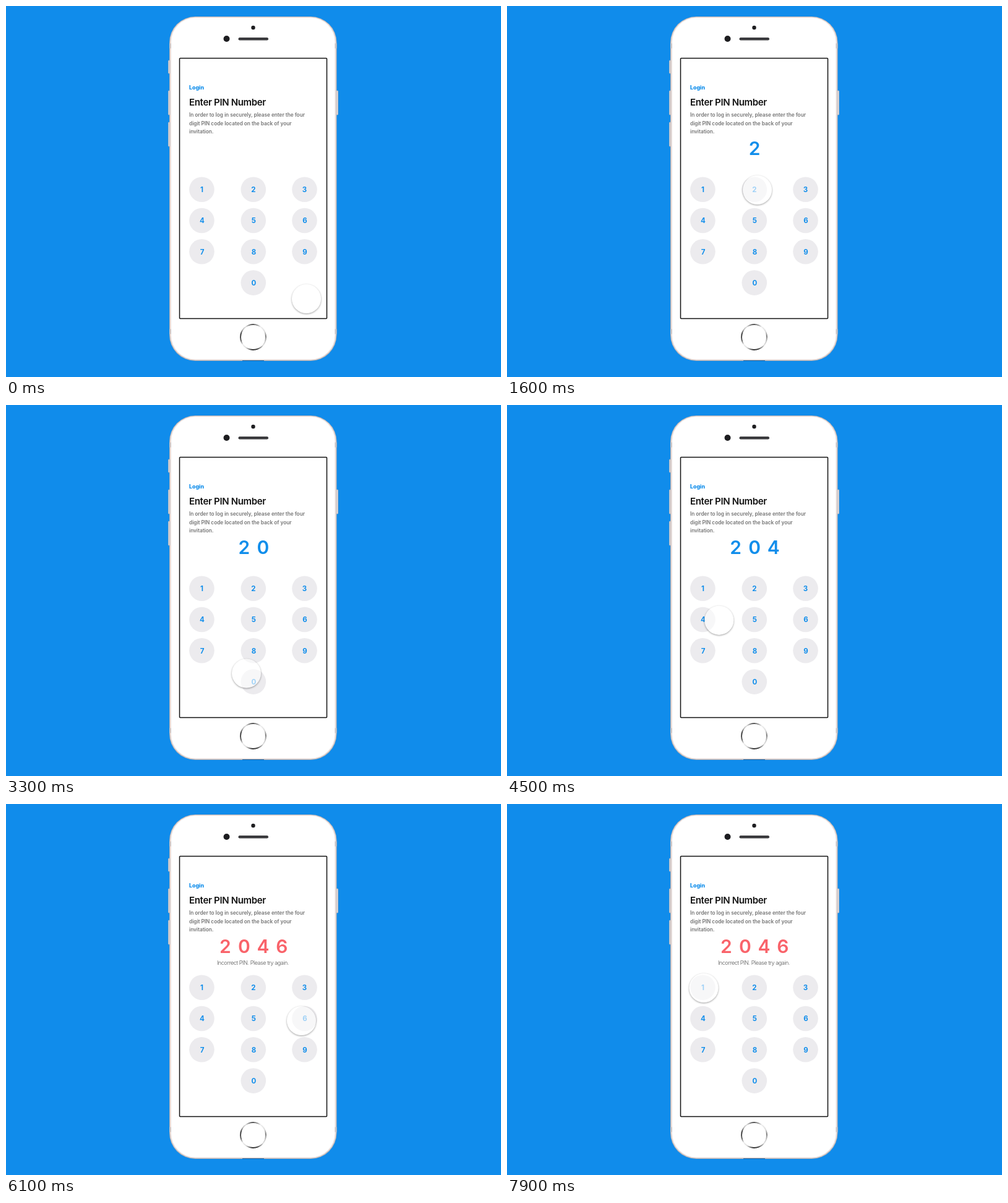
An HTML page that plays this animation: 800 by 600 pixels, repeating every 8 s.

```html
<!DOCTYPE html>
<html lang="en">
<head>
<meta charset="utf-8">
<title>PIN login</title>
<style>
html, body { margin: 0; width: 100%; height: 100%; overflow: hidden; background: #108ceb; }
svg { position: absolute; left: 0; top: 0; font-family: Inter, "Open Sans", sans-serif; }
.blue { fill: #118eeb; }
.mid { text-anchor: middle; }
.copy { font-size: 8.3px; font-weight: 600; letter-spacing: -.04px; fill: #767676; }
.key { font-size: 11.5px; font-weight: 700; }
#pin { font-size: 30px; font-weight: 600; }
#error { font-size: 9px; font-weight: 300; letter-spacing: -.4px; fill: #555; }
#home, #touch { position: absolute; border-radius: 50%; }
#home {
  left: 378px; top: 514px; width: 43px; height: 43px;
  background: conic-gradient(#555, #999 20deg, #eee 35deg, #ddd 65deg, #777 85deg, #ccc 110deg,
    #ddd 130deg, #444 160deg, #333 185deg, #ddd 215deg, #eee 235deg, #666 255deg, #333 285deg,
    #bbb 305deg, #ddd 325deg, #555 350deg);
}
#home::after { content: ""; position: absolute; inset: 2.3px; border-radius: 50%; background: #fff; }
#touch {
  left: -23.5px; top: -23.5px; width: 47px; height: 47px;
  background: rgba(255, 255, 255, .6);
  box-shadow: 0 1px 3px rgba(0, 0, 0, .4);
}
</style>
</head>
<body>
<svg width="800" height="600" viewBox="0 0 800 600">
  <g fill="#e9e3e3" stroke="#b5b0b3" stroke-width=".8">
    <rect x="262.4" y="88" width="4" height="21" rx="1"/>
    <rect x="262.4" y="137" width="4" height="39" rx="1"/>
    <rect x="262.4" y="188" width="4" height="39" rx="1"/>
    <rect x="532.6" y="137" width="4" height="39" rx="1"/>
  </g>
  <rect x="264" y="17" width="270.5" height="557" rx="42" fill="#b8b1b3"/>
  <rect x="265" y="17.8" width="268.5" height="555" rx="41" fill="#e9dfdd"/>
  <rect x="267" y="19" width="264.5" height="552.5" rx="39" fill="#fff"/>
  <path d="M264 64.5h3M531.5 64.5h3M264 526.5h3M531.5 526.5h3" stroke="#c9c6c8" stroke-width="8"/>
  <path d="M382 573.5h35" stroke="#285f92"/>
  <g fill="#1d1d20">
    <circle cx="399.5" cy="35" r="3.2"/>
    <circle cx="356.5" cy="53" r="5"/>
  </g>
  <rect x="375.5" y="51" width="48.5" height="4.4" rx="2.2" fill="#3a3a3d"/>
  <rect x="280.5" y="84.5" width="238" height="421" rx="1" fill="#fff" stroke="#111" stroke-width="1.5"/>
  <text class="blue" x="296" y="135" font-size="8.8" font-weight="800">Login</text>
  <text x="296" y="161.3" font-size="15" font-weight="600" letter-spacing="-.33" fill="#111">Enter PIN Number</text>
  <g class="copy">
    <text x="296" y="179.3">In order to log in securely, please enter the four</text>
    <text x="296" y="192.7">digit PIN code located on the back of your</text>
    <text x="296" y="206">invitation.</text>
  </g>
  <g id="pin" class="mid"></g>
  <text id="error" class="mid" x="399" y="260">Incorrect PIN. Please try again.</text>
  <g id="keys" class="mid"></g>
</svg>
<div id="home"></div>
<div id="touch"></div>
<script>
const $ = id => document.getElementById(id);
const LOOP = 8000, STEP = 100, ERROR_AT = 6000;

// Touch path: time, x, y
const path = [
  [0, 485, 473], [200, 485, 473],
  [1100, 404, 297], [1700, 404, 297],
  [2600, 398, 446], [3100, 398, 446],
  [4000, 319, 347.5], [4260, 319, 347.5],
  [5260, 479, 348.5], [5700, 479, 348.5],
  [6100, 477, 350], [6400, 477, 350],
  [7400, 317.5, 297], [LOOP, 317.5, 297]
];
const presses = [[1400, 2], [2900, 0], [4100, 4], [5800, 6]];

$('keys').innerHTML = [1, 2, 3, 4, 5, 6, 7, 8, 9, 0].map((n, i) => {
  const x = n ? [316.4, 399.8, 482.5][i % 3] : 399.8;
  const y = 296.7 + 50.3 * Math.floor(i / 3);
  const dx = n < 4 && n ? 0 : .6;
  return `<circle cx="${x}" cy="${y}" r="20.3" fill="#ecebee"/>
    <text class="key blue" x="${x + dx}" y="${y + 4.3}">${n}</text>`;
}).join('');

function touchAt(t) {
  const i = path.findIndex(p => p[0] > t);
  const [t0, x0, y0] = path[i - 1], [t1, x1, y1] = path[i];
  const p = (t - t0) / (t1 - t0), e = p * p * (3 - 2 * p);
  return [x0 + (x1 - x0) * e, y0 + (y1 - y0) * e];
}

let shown = '';
function draw(now) {
  const t = Math.floor(now % LOOP / STEP) * STEP;
  const [x, y] = touchAt(t);
  $('touch').style.transform = `translate(${x}px, ${y}px)`;

  const failed = t >= ERROR_AT;
  const digits = presses.filter(p => t >= p[0]).map(p => p[1]);
  const state = digits.join('') + failed;
  if (state !== shown) {
    shown = state;
    $('pin').innerHTML = digits.map((d, i) =>
      `<text x="${400.2 + (i - (digits.length - 1) / 2) * 30.5}" y="240.5">${d}</text>`).join('');
    $('pin').setAttribute('fill', failed ? '#f9636a' : '#118eeb');
    $('error').style.visibility = failed ? 'visible' : 'hidden';
  }
  requestAnimationFrame(loop);
}

const start = performance.now();
function loop() { draw(performance.now() - start); }
loop();
</script>
</body>
</html>
```
